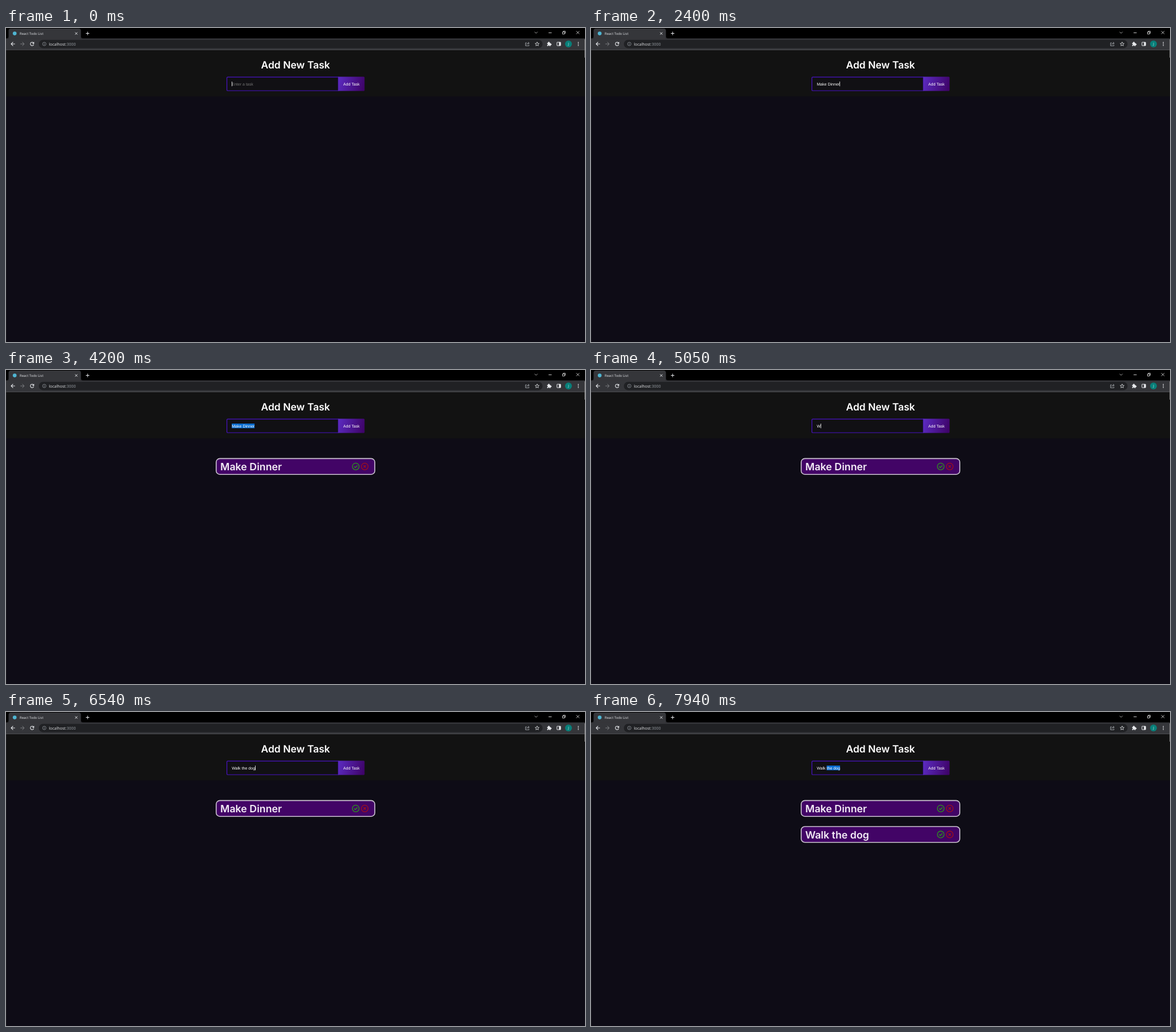
Write an HTML page with a canvas that moves like this. It is 1016 by 551 pixels and loops after 8000 ms.

```html
<!DOCTYPE html>
<html lang="en">
<head>
<meta charset="utf-8">
<title>React Todo List</title>
<style>
  html, body { margin: 0; width: 100%; height: 100%; overflow: hidden; background: #0e0c16; }
  canvas { display: block; }
</style>
</head>
<body>
<canvas id="stage" width="1016" height="551"></canvas>
<script>
const ctx = document.getElementById('stage').getContext('2d');
const LOOP = 8000;
const ARIAL = '7.055px "Liberation Sans", Arial, sans-serif';
const HEADING = '"Inter", sans-serif';
const CHROME = '"Open Sans", sans-serif';

// Input states: start time, value, caret shown, selection start
const states = [
  [0, '', true], [460, '', false],
  [790, 'M', true], [1000, 'Ma', true], [1140, 'Mak', true], [1210, 'Make', true],
  [1380, 'Make ', true], [1720, 'Make D', true], [1940, 'Make Di', true],
  [2140, 'Make Din', true], [2270, 'Make Dinn', true], [2400, 'Make Dinner', true],
  [2930, 'Make Dinner', false], [3480, 'Make Dinner', true], [4010, 'Make Dinner', false],
  [4110, 'Make Dinner', false, 5], [4200, 'Make Dinner', false, 0],
  [5050, 'W', true], [5270, 'Wa', true], [5380, 'Walk', true], [5640, 'Walk ', true],
  [5800, 'Walk t', true], [5860, 'Walk th', true], [5990, 'Walk the', true],
  [6330, 'Walk the d', true], [6480, 'Walk the do', true], [6540, 'Walk the dog', true],
  [7050, 'Walk the dog', false], [7590, 'Walk the dog', true],
  [7780, 'Walk the dog', false, 9], [7940, 'Walk the dog', false, 5]
];

const tasks = [
  { at: 2670, label: 'Make Dinner', y: 154.6 },
  { at: 6720, label: 'Walk the dog', y: 200.2 }
];

function rect(x, y, w, h, fill) {
  ctx.fillStyle = fill;
  ctx.fillRect(x, y, w, h);
}

function rounded(x, y, w, h, radii, fill, stroke, width) {
  ctx.beginPath();
  ctx.roundRect(x, y, w, h, radii);
  if (fill) { ctx.fillStyle = fill; ctx.fill(); }
  if (stroke) { ctx.strokeStyle = stroke; ctx.lineWidth = width; ctx.stroke(); }
}

function disc(x, y, r, fill) {
  ctx.beginPath();
  ctx.arc(x, y, r, 0, Math.PI * 2);
  ctx.fillStyle = fill;
  ctx.fill();
}

function ring(x, y, r, stroke, width, from = 0, to = Math.PI * 2) {
  ctx.beginPath();
  ctx.arc(x, y, r, from, to);
  ctx.strokeStyle = stroke;
  ctx.lineWidth = width;
  ctx.stroke();
}

function path(d, x, y, stroke, width, fill) {
  ctx.save();
  ctx.translate(x, y);
  const shape = new Path2D(d);
  if (fill) { ctx.fillStyle = fill; ctx.fill(shape); }
  if (stroke) { ctx.strokeStyle = stroke; ctx.lineWidth = width; ctx.stroke(shape); }
  ctx.restore();
}

function text(value, x, y, font, fill, align = 'left') {
  ctx.font = font;
  ctx.fillStyle = fill;
  ctx.textAlign = align;
  ctx.fillText(value, x, y);
}

function drawTabs() {
  rect(0, 0, 1016, 19, '#000');
  rounded(4.5, 1, 127, 20, [4, 4, 0, 0], '#35363a');
  path('M0 18.5Q4.5 18.5 4.5 14V18.5ZM136 18.5Q131.5 18.5 131.5 14V18.5Z', 0, 0, null, 0, '#35363a');
  disc(15.2, 9.6, 3.3, '#4fb5d2');
  text('React Todo List', 24, 11.7, `5.95px ${CHROME}`, '#e4e6e9');
  path('M-2 -2L2 2M2 -2L-2 2', 123.3, 9.6, '#e8eaed', 1);
  path('M-3 0H3M0 -3V3', 143.2, 9.5, '#e8eaed', 1);
  path('M-2.6 -1.3L0 1.3L2.6 -1.3', 930.2, 8, '#c8c8c8', 0.8);
  path('M-2.7 0H2.7', 954.8, 8.4, '#fff', 0.8);
  path('M-2.4 -1H1.2V2.6H-2.4ZM-1 -1V-2.4H2.5V1.2H1.2', 978.9, 8, '#fff', 0.75);
  path('M-2.6 -2.6L2.6 2.6M2.6 -2.6L-2.6 2.6', 1003.4, 8, '#fff', 0.75);
}

function drawToolbar() {
  const light = '#e8eaed';
  const grey = '#9aa0a6';
  rect(0, 18.3, 1016, 20.2, '#35363a');
  rect(0, 37.8, 1016, 1, '#4b4c4f');
  path('M3.7 0H-3M0.4 -3.4L-3 0L0.4 3.4', 12, 28, light, 1.1);
  path('M-3.7 0H3M-0.4 -3.4L3 0L-0.4 3.4', 29, 28, '#7d7f82', 1);
  ring(45.8, 28, 3, light, 1.1, 0.3, 5.5);
  path('M3.6 -3.8V-0.3H0.1Z', 45.8, 28, null, 0, light);

  rounded(57.6, 20.8, 884, 14.6, 7.3, '#202124');
  ring(67.2, 28, 3.1, grey, 0.7);
  path('M0 -0.5V1.8M0 -1.8V-1', 67.2, 28, grey, 0.8);
  const urlFont = `7px ${CHROME}`;
  text('localhost', 75.2, 30.6, urlFont, light);
  text(':3000', 75.2 + ctx.measureText('localhost').width, 30.6, urlFont, grey);

  path('M-1.3 -2H-3.3V3.2H2.7V1.5M-1.5 1.2Q-1 -1.3 2.4 -1.3M1 -3.2L3.2 -1.3L1 0.6', 915, 28, '#bdc1c6', 0.8);
  let star = '';
  for (let i = 0; i < 10; i++) {
    const r = i % 2 ? 1.65 : 3.7;
    const a = (i / 5 - 0.5) * Math.PI;
    star += `${i ? 'L' : 'M'}${(r * Math.cos(a)).toFixed(2)} ${(r * Math.sin(a)).toFixed(2)}`;
  }
  path(star + 'Z', 932, 28.3, light, 0.8);

  rounded(949.6, 26, 6, 5.7, 0.7, light);
  disc(952.5, 25.6, 1.4, light);
  disc(956, 28.8, 1.4, light);
  disc(949.7, 28.8, 1.1, '#35363a');
  disc(952.5, 31.7, 1.1, '#35363a');
  rounded(966.8, 25, 6.4, 6, 0.4, null, light, 1);
  rect(970.3, 25, 3, 6, light);
  disc(987, 28, 6, '#087f79');
  text('J', 987, 30.2, `6px ${CHROME}`, '#e5f2f1', 'center');
  for (const dy of [-2.6, 0, 2.6]) disc(1004.3, 28 + dy, 0.85, light);
}

function drawPage() {
  rect(0, 38.8, 1016, 81.7, '#121212');
  rect(0, 120.3, 1016, 430.7, '#0e0c16');
  rect(0, 38.8, 0.6, 512.2, '#25252a');
  text('Add New Task', 508, 70.5, `600 17.5px ${HEADING}`, '#fff', 'center');

  rounded(387.6, 86.1, 195.6, 23.9, [1.6, 0, 0, 1.6], '#111014', '#4913c4', 1.2);
  const shade = ctx.createLinearGradient(583, 92, 629, 104);
  shade.addColorStop(0, '#5b2abf');
  shade.addColorStop(1, '#3e0367');
  rounded(583, 85.5, 46.2, 25.1, [0, 1.6, 1.6, 0], shade);
  text('Add Task', 606.2, 100.5, ARIAL, '#fff', 'center');
}

function drawInput([, value, caret, selectFrom]) {
  const left = 396.2;
  ctx.font = ARIAL;
  const end = left + ctx.measureText(value).width;
  if (selectFrom !== undefined) {
    const start = left + ctx.measureText(value.slice(0, selectFrom)).width;
    rect(start, 94, end - start, 8.2, '#0a6ccf');
  }
  text(value || 'Enter a task', left, 100.5, ARIAL, value ? '#fff' : '#757575');
  if (caret) rect(end, 94, 0.8, 8.2, '#fff');
}

function drawTask({ label, y }) {
  const mid = y + 14.7;
  const green = '#2c981c';
  const red = '#a0101c';
  rounded(368.8, y + 0.8, 278.4, 27.8, 6.5, '#420466', '#cdc5d2', 1.6);
  text(label, 376, y + 21.4, `600 17.8px ${HEADING}`, '#f3edf6');
  ring(613.7, mid, 5.9, green, 1.3);
  path('M-2.8 0L-0.8 1.9L2.9 -1.8', 613.7, mid, green, 1.4);
  ring(629.5, mid, 5.9, red, 1.3);
  path('M-2 -2L2 2M2 -2L-2 2', 629.5, mid, red, 1.4);
}

function draw(t, state) {
  drawPage();
  drawTabs();
  drawToolbar();
  rect(1015.2, 20, 0.8, 32, '#8b8b8d');
  drawInput(state);
  tasks.filter(task => t >= task.at).forEach(drawTask);
}

let shown = '';

function tick() {
  const t = performance.now() % LOOP;
  const state = states.filter(([start]) => start <= t).pop();
  const key = `${state[0]}/${tasks.filter(task => t >= task.at).length}`;
  if (key !== shown) {
    draw(t, state);
    shown = key;
  }
  requestAnimationFrame(tick);
}

ctx.textRendering = 'geometricPrecision';
tick();
</script>
</body>
</html>
```
